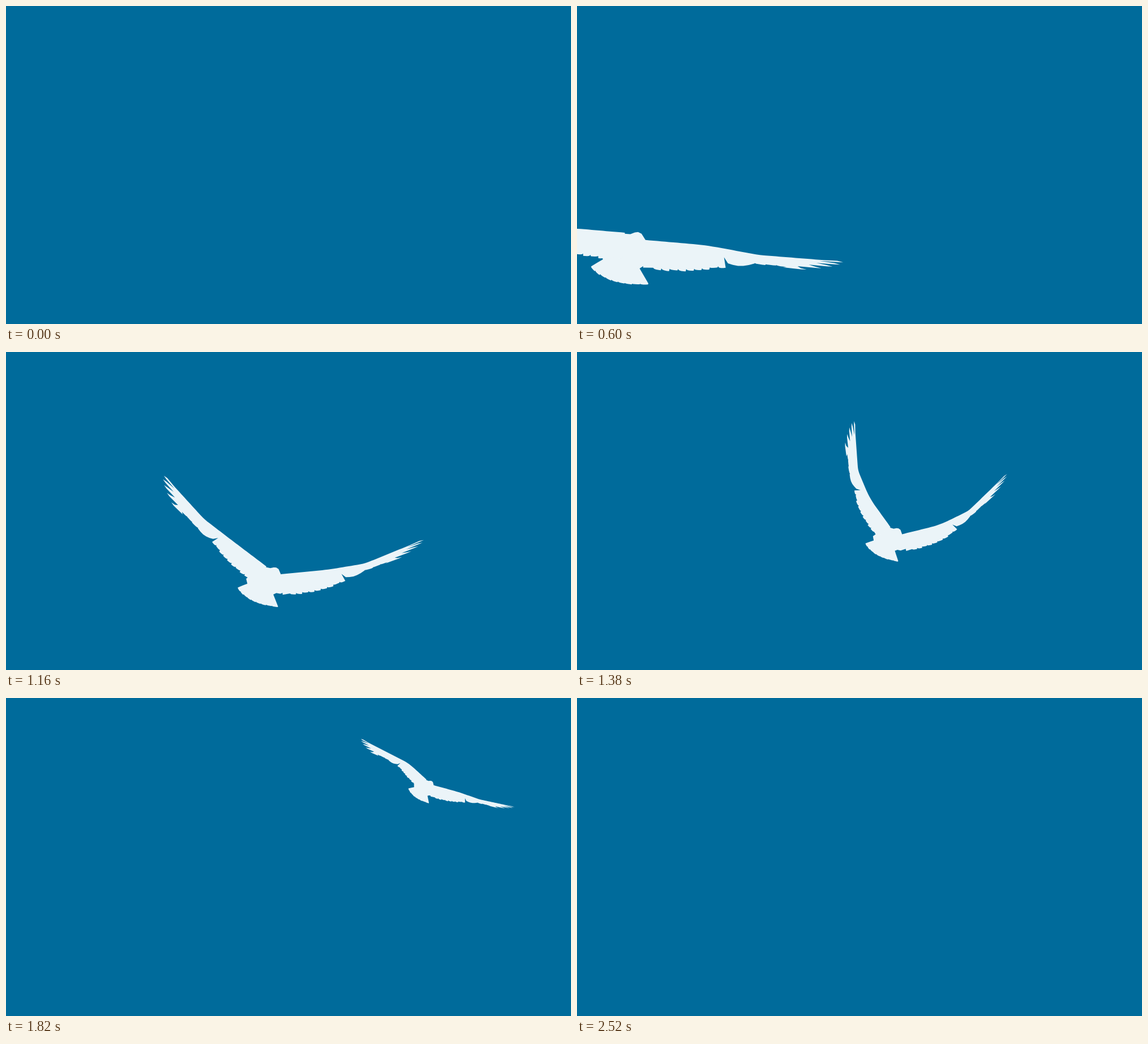
An HTML page with a canvas for the animation above (3480 ms loop, 998 px wide and 561 px high).

```html
<!DOCTYPE html>
<html lang="en">
<head>
<meta charset="utf-8">
<title>Bird in flight</title>
<style>
  html, body { margin: 0; width: 100%; height: 100%; overflow: hidden; background: #006b9b; }
  canvas { display: block; width: 998px; height: 561px; }
</style>
</head>
<body>
<canvas id="stage" width="998" height="561"></canvas>
<script>
const ctx = document.getElementById('stage').getContext('2d');
const LOOP = 3480, START = 60, END = 2520, STEP = 20;
const RAD = Math.PI / 180;

// Flight path and wing beat: raise angles are the mean of both wings
const keys = [
  { t: 60, x: -275, y: 378, size: 1.42, arm: 39, hand: 58 },
  { t: 360, x: -64, y: 387, size: 1.275, arm: 17, hand: 22 },
  { t: 600, x: 108, y: 400, size: 1.165, arm: 0, hand: -7.5 },
  { t: 740, x: 211, y: 411, size: 1.11, arm: -5, hand: -16 },
  { t: 960, x: 369, y: 412, size: 1, arm: 11.5, hand: 9.5 },
  { t: 1140, x: 468, y: 386, size: 0.88, arm: 20, hand: 32 },
  { t: 1380, x: 568, y: 312, size: 0.725, arm: 34, hand: 65 },
  { t: 1680, x: 697, y: 207, size: 0.567, arm: 24, hand: 28 },
  { t: 1820, x: 752, y: 147, size: 0.49, arm: 13.5, hand: 7.5 },
  { t: 2200, x: 849, y: 62, size: 0.27, arm: 14, hand: 18 },
  { t: 2520, x: 908, y: -25, size: 0.1, arm: 30, hand: 50 }
];

const wings = [
  { side: -1, shoulder: [-20, -2], length: 280, chord: 40, palm: 23 },
  { side: 1, shoulder: [10, 12], length: 302, chord: 42, palm: 14 }
];

const mix = (a, b, k) => a + (b - a) * k;
const noise = i => Math.abs(Math.sin(i * 12.9898) * 43758.5453) % 1;
const ease = (a, b, v) => {
  const k = Math.min(1, Math.max(0, (v - a) / (b - a)));
  return k * k * (3 - 2 * k);
};

// Cubic curve through the keys
function sample(t) {
  let i = 0;
  while (i < keys.length - 2 && t >= keys[i + 1].t) i++;
  const a = keys[i], b = keys[i + 1];
  const p = keys[i - 1] || a, n = keys[i + 2] || b;
  const h = b.t - a.t, u = (t - a.t) / h;
  const at = name => {
    const d = b[name] - a[name];
    const m0 = (b[name] - p[name]) / (b.t - p.t) * h;
    const m1 = (n[name] - a[name]) / (n.t - a.t) * h;
    return a[name] + u * (m0 + u * (3 * d - 2 * m0 - m1 + u * (m0 + m1 - 2 * d)));
  };
  return { x: at('x'), y: at('y'), size: at('size'), arm: at('arm'), hand: at('hand') };
}

function spin([x, y], deg) {
  const c = Math.cos(deg * RAD), s = Math.sin(deg * RAD);
  return [x * c - y * s, x * s + y * c];
}

// Calls visit(k, bump) along a row of uneven feather ends
function fringe(count, visit) {
  for (let i = 0; i < count; i++) {
    const height = 0.5 + noise(i + 1);
    for (const u of [0.05, 0.3, 0.6, 0.85, 1]) {
      visit((i + u) / count, height * Math.sqrt(1 - u * u));
    }
  }
}

function fill(points) {
  ctx.beginPath();
  for (const [x, y] of points) ctx.lineTo(x, y);
  ctx.fill();
}

function drawWing({ side, shoulder, length, chord, palm }, arm, hand, roll) {
  // The leading edge bends at mid-arm and at the wrist
  const mid = mix(arm, hand, 0.6) - 6;
  const angle = u => RAD * mix(mix(arm, mid, ease(0.2, 0.42, u)), hand, ease(0.52, 0.62, u));
  const N = 100;
  const spine = [spin(shoulder, roll)];
  for (let i = 0; i < N; i++) {
    const a = angle((i + 0.5) / N), [x, y] = spine[i];
    spine.push([x + side * Math.cos(a) * length / N, y - Math.sin(a) * length / N]);
  }
  // u runs from shoulder to tip, depth goes back across the wing
  const point = (u, depth) => {
    const i = Math.min(N - 1, Math.floor(u * N)), k = u * N - i, a = angle(u);
    return [
      mix(spine[i][0], spine[i + 1][0], k) + side * Math.sin(a) * depth,
      mix(spine[i][1], spine[i + 1][1], k) + Math.cos(a) * depth
    ];
  };

  const outline = [];
  const add = (u, depth) => outline.push(point(u, depth));
  for (let u = 0; u < 0.91; u += 0.02) add(u, 0);

  const fingers = 5;
  for (let i = 0; i < fingers; i++) {
    const v = i / (fingers - 1);
    const tip = 1 - 0.18 * v ** 1.8;
    add(tip - 0.03, palm * (v - 0.04) * 1.1);
    add(tip, palm * v * 1.1 + 1);
    add(tip - 0.03, palm * (v + 0.08) * 1.1);
    add(tip - 0.12, palm * (v + 0.12));
  }
  fringe(3, (k, bump) => add(mix(0.72, 0.56, k), palm * 0.95 + bump));
  for (let k = 0; k <= 1; k += 0.2) add(mix(0.56, 0.43, k), mix(palm, 21, k) + 4 * Math.sin(k * Math.PI));
  add(0.405, 13);
  fringe(9, (k, bump) => {
    const u = mix(0.425, 0.05, k);
    add(u, chord * (1 - 0.4 * (u / 0.42) ** 3) + 3 * bump - 1);
  });
  add(0, chord);
  fill(outline);
}

function drawBody(roll) {
  const outline = [
    [-60, 25], [-30, -2], [-12, 1], [-5, -1], [0, -1], [5, 2], [10, 12],
    [24, 25], [24, 46], [11, 52], [3, 51], [-3, 54]
  ];
  // Fanned tail, right corner to left corner
  const from = [8, 78], pull = [-51, 77], to = [-76, 44];
  outline.push(from);
  fringe(9, (k, bump) => {
    const curve = j => mix(mix(from[j], pull[j], k), mix(pull[j], to[j], k), k);
    outline.push([curve(0) - bump * k, curve(1) + bump]);
  });
  outline.push([-66, 39], [-57, 35]);
  fill(outline.map(p => spin(p, roll)));
}

function draw(t) {
  ctx.setTransform(1, 0, 0, 1, 0, 0);
  ctx.fillStyle = '#006b9b';
  ctx.fillRect(0, 0, 998, 561);
  if (t < START || t >= END) return;

  const { x, y, size, arm, hand } = sample(t);
  const roll = (t - 960) / 65;
  const armBank = (t - 350) / 51;
  const handBank = 0.85 * armBank + 0.15 * hand - 6;
  ctx.setTransform(size, 0, 0, size, x, y);
  ctx.fillStyle = '#ebf4f8';
  drawBody(roll);
  for (const wing of wings) {
    drawWing(wing, arm - wing.side * armBank, hand - wing.side * handBank, roll);
  }
}

const begin = performance.now();
function tick() {
  const t = (performance.now() - begin) % LOOP;
  draw(Math.floor(t / STEP) * STEP);
  requestAnimationFrame(tick);
}
tick();
</script>
</body>
</html>
```
